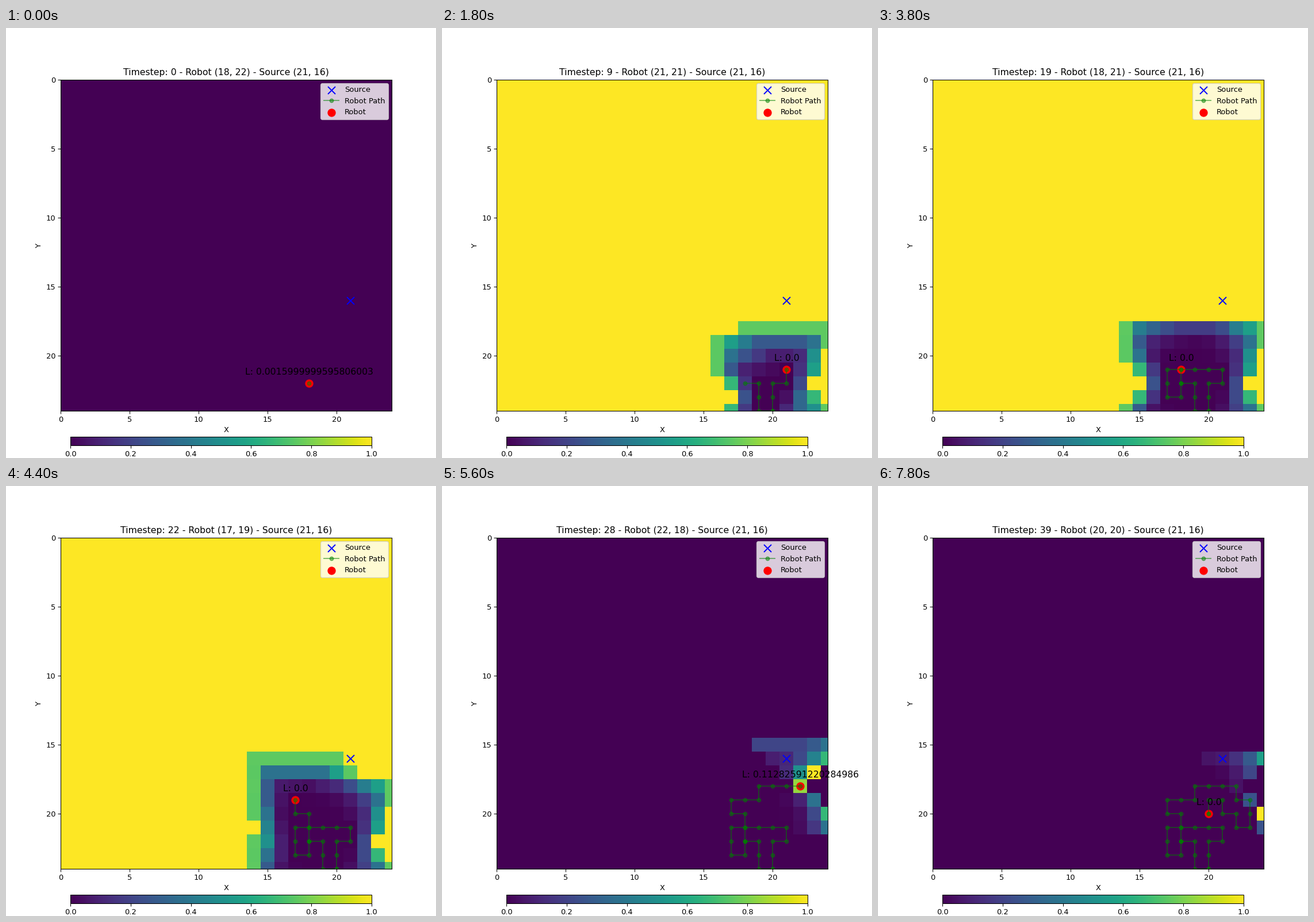
Recreate the animation shown at these times as a matplotlib script. Size 748x748 px, loop 8000 ms.

```python
import numpy as np
import matplotlib.pyplot as plt
from matplotlib.animation import FuncAnimation
from matplotlib.cm import ScalarMappable
from matplotlib.colors import Normalize

SIZE = 25
REACH = 3
SOURCE = (21, 16)
START = (18, 22)
MOVES = "RDDR.UURULLLLDDRU.UULURRURRRDRDDLULULD."
DETECTIONS = {28, 30}
STEP = {"R": (1, 0), "L": (-1, 0), "U": (0, -1), "D": (0, 1), ".": (0, 0)}


def walk():
    path = [START]
    for move in MOVES:
        dx, dy = STEP[move]
        x, y = path[-1]
        path.append((x + dx, y + dy))
    return path


def hit_chance(x, y):
    """Chance of sensing a source in each cell: a cone above and below."""
    rows, cols = np.mgrid[:SIZE, :SIZE]
    dy, dx = abs(rows - y), abs(cols - x)
    cone = (dx <= dy) & (dy <= REACH)
    return np.where(cone, 1 / (1 + dy), 0)


def beliefs(path):
    belief = np.full((SIZE, SIZE), 1 / SIZE**2, np.float32)
    history = [belief]
    for t, (x, y) in enumerate(path[1:], 1):
        hit = hit_chance(x, y)
        belief = belief * (hit if t in DETECTIONS else 1 - hit)
        belief = belief / belief.sum()
        history.append(belief)
    return history


path = walk()
history = beliefs(path)

fig, ax = plt.subplots(figsize=(8, 8), dpi=93.5)
image = ax.imshow(history[0], cmap="viridis", vmin=0, vmax=1)
ax.scatter(*SOURCE, c="blue", marker="x", s=100, label="Source")
trail, = ax.plot([], [], "go-", markersize=5, alpha=0.5, label="Robot Path")
robot = ax.scatter(*START, c="red", marker="o", s=100, label="Robot")
level = ax.text(0, 0, "", ha="center", va="bottom", fontsize=12)
ax.set(xlim=(0, SIZE - 1), ylim=(SIZE - 1, 0), xlabel="X", ylabel="Y")
ax.legend(loc="upper right")

bar = fig.add_axes([0.15, 0.03, 0.7, 0.02])
fig.colorbar(ScalarMappable(Normalize(0, 1), "viridis"), cax=bar,
             orientation="horizontal")


def draw(t):
    x, y = path[t]
    belief = history[t]
    spread = np.ptp(belief)
    image.set_data((belief - belief.min()) / (spread or 1))
    trail.set_data(*zip(*path[:t + 1]))
    robot.set_offsets([(x, y)])
    level.set_position((x, y - 0.5))
    level.set_text(f"L: {float(belief[y, x])}")
    ax.set_title(f"Timestep: {t} - Robot ({x}, {y}) - "
                 f"Source ({SOURCE[0]}, {SOURCE[1]})")


anim = FuncAnimation(fig, draw, frames=len(path), interval=200,
                     repeat=True, repeat_delay=0, blit=False)
plt.show()
```
